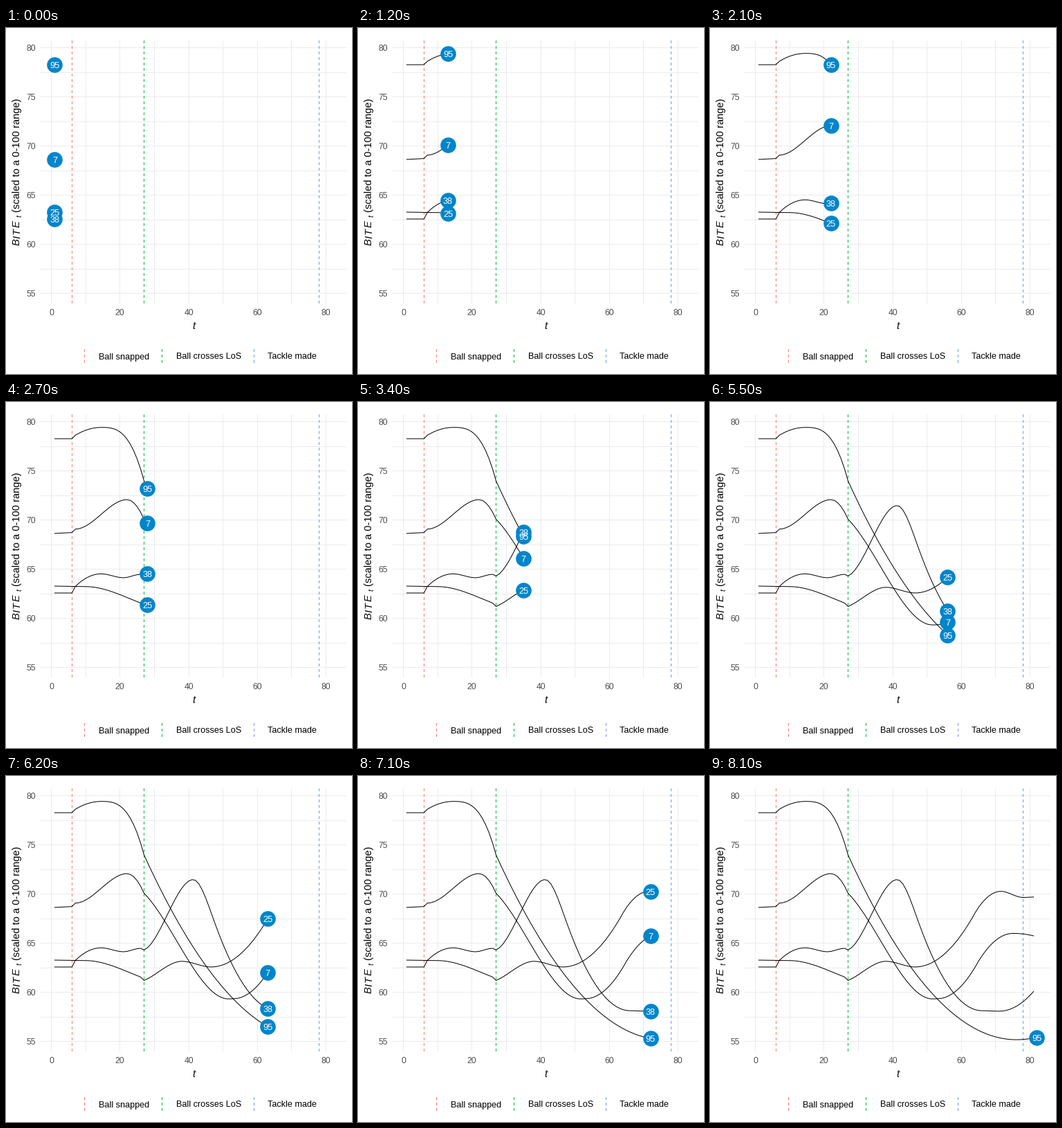
Animation, 500 px wide and 500 px high, one loop 8.2 s. Source, as a matplotlib script:

```python
import matplotlib.pyplot as plt
import numpy as np
from matplotlib.animation import FuncAnimation

SIZE, DPI = 500, 100
PX = 72 / DPI
FRAMES, INTERVAL = 82, 100
LEFT, RIGHT, TOP, BOTTOM = 50, 492, 18, 398

plt.rcParams["font.family"] = "Liberation Sans"

# An ease is the pair of relative speeds at the start and end of a leg.
LINEAR, SMOOTH, IN, OUT = (1, 1), (0, 0), (0, 2), (2, 0)
PLUNGE, LEAN_IN, SOFT_OUT = (0, 3), (0, 1.3), (0.8, 0)

# Start value, then legs: end time, end value, ease.
PLAYERS = {
    "95": (78.3, [(6, 78.3, LINEAR), (7, 78.65, LINEAR), (14.5, 79.45, OUT),
                  (27, 74, PLUNGE), (76, 55.2, OUT), (82, 55.45, IN)]),
    "7": (68.66, [(6, 68.75, LINEAR), (7, 69.1, LINEAR), (22, 72.1, SMOOTH),
                  (27, 70.1, IN), (51.5, 59.35, SOFT_OUT), (53, 59.37, IN),
                  (65, 63.2, IN), (75, 66.02, OUT), (81, 65.77, IN)]),
    "38": (62.6, [(6, 62.6, LINEAR), (7, 63.27, LINEAR), (14.5, 64.55, OUT),
                  (21, 64.15, SMOOTH), (26, 64.5, SMOOTH), (27, 64.33, LINEAR),
                  (41.3, 71.5, (0.3, 0)), (48, 66.7, LEAN_IN),
                  (66, 58.15, OUT), (71, 58.1, SMOOTH), (81, 60.1, IN)]),
    "25": (63.3, [(10, 63.25, LINEAR), (26, 61.58, LEAN_IN),
                  (27, 61.23, LINEAR), (38, 63.18, SOFT_OUT),
                  (46.5, 62.6, SMOOTH), (63, 67.5, IN), (71.5, 70.3, OUT),
                  (78, 69.67, SMOOTH), (81, 69.72, LINEAR)]),
}


def px_x(t):
    return 65.5 + 4.963 * t


def px_y(value):
    return 28.9 + (80 - value) * 14.2


def pixel_centre(position):
    return np.floor(position) + 0.5


def build_curve(value, legs):
    steps = np.arange(1, legs[-1][0] + 1)
    curve = np.empty(len(steps))
    start = 1
    for end, target, (m0, m1) in legs:
        inside = (steps >= start) & (steps <= end)
        u = (steps[inside] - start) / (end - start)
        eased = u * u * (3 - 2 * u) + m0 * u * (1 - u) ** 2 - m1 * u * u * (1 - u)
        curve[inside] = value + (target - value) * eased
        start, value = end, target
    return px_x(steps), px_y(curve)


fig = plt.figure(figsize=(SIZE / DPI, SIZE / DPI), dpi=DPI, facecolor="white")
ax = fig.add_axes([0, 0, 1, 1])
ax.set(xlim=(0, SIZE), ylim=(SIZE, 0))
ax.axis("off")


def segment(x, y, color, dashed=False):
    ax.plot(x, y, color=color, lw=PX, snap=False, zorder=2 if dashed else 1,
            ls=(0, (4, 4)) if dashed else "-", dash_capstyle="butt",
            solid_capstyle="butt")


def label(x, y, text, size, color="black", **kw):
    kw = {"ha": "left", "va": "baseline", **kw}
    return ax.text(x, y, text, fontsize=size * PX, color=color, **kw)


def side_label(x, y, text, size, **kw):
    label(x, y, text, size, rotation=90, rotation_mode="anchor", **kw)


# Grid and tick labels
for value in np.arange(55, 80.1, 2.5):
    y = pixel_centre(px_y(value))
    segment([LEFT, RIGHT], [y, y], "#EBEBEB")
    if value % 5 == 0:
        label(43.3, y + 4.6, f"{value:.0f}", 12.2, "#4D4D4D", ha="right")
for t in range(0, 81, 10):
    x = pixel_centre(px_x(t))
    segment([x, x], [TOP, BOTTOM], "#EBEBEB")
    if t % 20 == 0:
        label(x, 415.3, str(t), 12.2, "#4D4D4D", ha="center")

# Event lines and legend
EVENTS = [(6, "#F8766D", 113.5, "Ball snapped"),
          (27, "#00BA38", 225.5, "Ball crosses LoS"),
          (78, "#619CFF", 358.5, "Tackle made")]
for t, color, key_x, text in EVENTS:
    x = pixel_centre(px_x(t))
    segment([x, x], [BOTTOM, TOP], color, dashed=True)
    segment([key_x, key_x], [484, 464], color, dashed=True)
    label(key_x + 20, 478.5, text, 12.6)

# Axis titles
label(271, 435, "t", 14.7, style="italic", ha="center")
for letter, y in zip("BITE", (314, 303.5, 297.5, 288)):
    side_label(20, y, letter, 14.7, style="italic")
side_label(23, 273, "t", 10.3, style="italic")
side_label(20, 265.5, "(scaled to a 0-100 range)", 14.6)

players = []
for name, (value, legs) in PLAYERS.items():
    xs, ys = build_curve(value, legs)
    trail, = ax.plot([], [], color="black", lw=PX, zorder=3)
    dot, = ax.plot([], [], "o", color="#0085CA", ms=22.6 * PX, mew=0, zorder=4)
    number = label(0, 0, name, 12.8, "white", ha="center", zorder=5)
    players.append((xs, ys, trail, dot, number))


def draw(frame):
    for xs, ys, trail, dot, number in players:
        active = frame < len(xs)
        last = min(frame, len(xs) - 1)
        x, y = xs[last], ys[last]
        trail.set_data(xs[:last + 1], ys[:last + 1])
        dot.set_data([x], [y])
        number.set_position((x, y + 5))
        dot.set_visible(active)
        number.set_visible(active)
    return [artist for player in players for artist in player[2:]]


anim = FuncAnimation(fig, draw, frames=FRAMES, interval=INTERVAL,
                     init_func=lambda: draw(0), repeat=True, repeat_delay=0)
plt.show()
```
